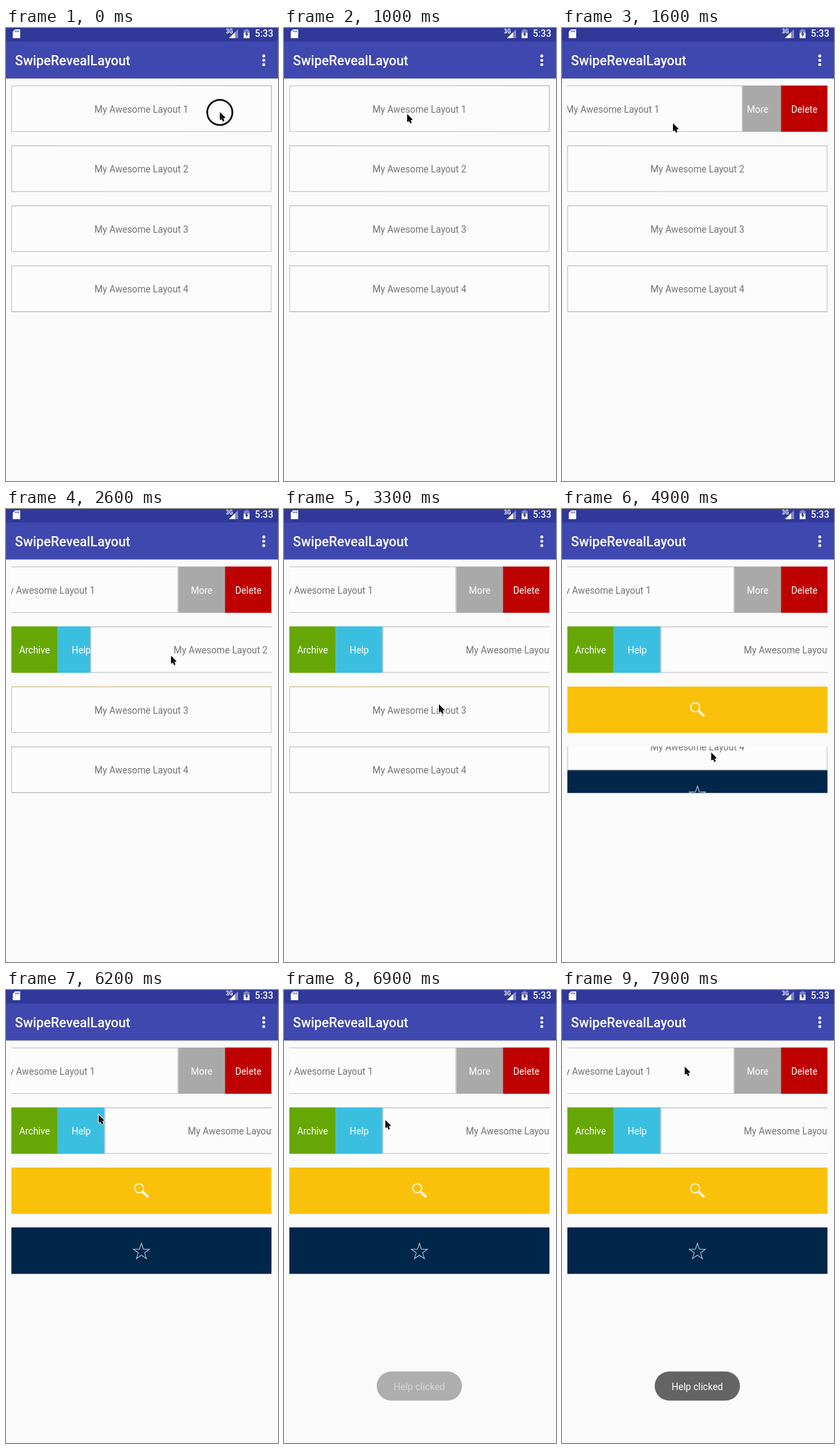
Write an HTML page with a canvas that moves like this. It is 402 px wide and 668 px high and loops after 8 s.

```html
<!DOCTYPE html>
<html lang="en">
<head>
<meta charset="utf-8">
<title>Swipe to reveal</title>
<style>
html, body { margin: 0; width: 100%; height: 100%; overflow: hidden; background: #fafafa; }
canvas { display: block; width: 402px; height: 668px; }
</style>
</head>
<body>
<canvas id="stage"></canvas>
<script>
const W = 402, H = 668, LOOP = 8000, STEP = 100;
const LEFT = 7.7, TOP = 84.6, PITCH = 88.5, ROW_W = 384.9, ROW_H = 68.7, BTN = 69, SETTLE = 750;
const RIGHT = LEFT + ROW_W, MID = LEFT + ROW_W / 2;
const INDIGO = '#303899', DIM = '#8388c2', WHITE = '#fff';
const canvas = document.getElementById('stage');
const ctx = canvas.getContext('2d');
const ratio = window.devicePixelRatio || 1;
canvas.width = W * ratio;
canvas.height = H * ratio;

// Buttons lie still under a row; a panel with an icon is pushed in with it.
const rows = [
  { start: 1186, dx: -2 * BTN, dy: 0, buttons: [['More', '#a9a9a9'], ['Delete', '#be0000']] },
  { start: 2250, dx: 2 * BTN, dy: 0, buttons: [['Archive', '#67a705'], ['Help', '#3bbfe1']] },
  { start: 3824, dx: 0, dy: ROW_H, fill: '#f9c10a', icon: magnifier },
  { start: 4750, dx: 0, dy: -ROW_H, fill: '#00264a', icon: star }
];

// Pointer key points: time, x, y
const stops = [
  [300, 316, 124], [1150, 170, 127], [1600, 164, 140.5],
  [2150, 88, 211], [2400, 246, 206], [3300, 229, 288],
  [3750, 228, 284], [4200, 222.5, 392], [4700, 221, 413],
  [4900, 220.5, 359], [5500, 386, 34], [6200, 137, 184],
  [6500, 137, 184], [6750, 104, 207], [7300, 355, 124], [7900, 181.5, 113]
];

const clamp = v => Math.max(0, Math.min(1, v));
const easeOut = u => 1 - Math.pow(1 - clamp(u), 3);
const smooth = u => u * u * (3 - 2 * u);

function pointerAt(t) {
  const next = Math.max(1, stops.findIndex(s => s[0] >= t));
  const [t0, x0, y0] = stops[next - 1], [t1, x1, y1] = stops[next];
  const k = smooth(clamp((t - t0) / (t1 - t0)));
  return [x0 + (x1 - x0) * k, y0 + (y1 - y0) * k];
}

function box(x, y, w, h, color) {
  ctx.fillStyle = color;
  ctx.fillRect(x, y, w, h);
}

function label(str, x, y, color = WHITE, size = 13.8, weight = 400, align = 'center') {
  ctx.font = `${weight} ${size}px Roboto, sans-serif`;
  ctx.textAlign = align;
  ctx.fillStyle = color;
  ctx.fillText(str, x, y);
}

function circle(x, y, r) {
  ctx.beginPath();
  ctx.arc(x, y, r, 0, Math.PI * 2);
}

function stroke(color, width) {
  ctx.strokeStyle = color;
  ctx.lineWidth = width;
  ctx.stroke();
}

// Right triangle with its right angle at x, y
function corner(x, y, w, h, color) {
  ctx.beginPath();
  ctx.moveTo(x, y);
  ctx.lineTo(x + w, y);
  ctx.lineTo(x, y + h);
  ctx.fillStyle = color;
  ctx.fill();
}

function magnifier(x, y) {
  const color = '#fef5d8';
  circle(x - 3.4, y - 3.6, 6.7);
  stroke(color, 1.8);
  ctx.beginPath();
  ctx.moveTo(x + 3, y + 2.8);
  ctx.lineTo(x + 9, y + 8.4);
  ctx.lineCap = 'round';
  stroke(color, 3.8);
  ctx.lineCap = 'butt';
}

function star(x, y) {
  ctx.beginPath();
  for (let i = 0; i < 10; i++) {
    const r = i % 2 ? 4.9 : 12.5, a = (i / 5 - 0.5) * Math.PI;
    ctx.lineTo(x + r * Math.cos(a), y + 1.6 + r * Math.sin(a));
  }
  ctx.closePath();
  stroke('#b4c0cc', 1.1);
}

function drawRow(row, i, t) {
  const p = easeOut((t - row.start) / SETTLE);
  const top = TOP + PITCH * i;
  const x = LEFT + row.dx * p, y = top + row.dy * p;
  ctx.save();
  ctx.beginPath();
  ctx.rect(LEFT, top, ROW_W, ROW_H);
  ctx.clip();
  if (row.buttons) {
    const first = row.dx > 0 ? LEFT : RIGHT - 2 * BTN;
    row.buttons.forEach(([name, color], n) => {
      box(first + n * BTN, top, BTN, ROW_H, color);
      label(name, first + (n + 0.5) * BTN, top + 39.9);
    });
  }
  box(x, y, ROW_W, ROW_H, '#fcfcfc');
  ctx.strokeStyle = '#c4c4c8';
  ctx.lineWidth = 1.3;
  ctx.strokeRect(x + 0.6, y + 0.6, ROW_W - 1.2, ROW_H - 1.2);
  label('My Awesome Layout ' + (i + 1), x + ROW_W / 2, y + 39.9, '#737373');
  if (row.icon) {
    const panel = y - row.dy;
    box(LEFT, panel, ROW_W, ROW_H, row.fill);
    row.icon(MID, panel + ROW_H / 2);
  }
  ctx.restore();
}

function drawBars() {
  box(0, 0, W, 20, INDIGO);
  box(0, 20, W, 54.5, '#3f48ae');
  label('SwipeRevealLayout', 13.3, 55, WHITE, 19.6, 500, 'left');
  for (let i = -1; i <= 1; i++) {
    circle(381, 47.6 + i * 6.3, 2.2);
    ctx.fillStyle = WHITE;
    ctx.fill();
  }

  // Memory card
  box(10, 2, 11, 13, WHITE);
  corner(10, 2, 3.5, 3.5, INDIGO);
  for (let i = 0; i < 3; i++) box(13.4 + i * 2.3, 3.6, 1.1, 2.6, INDIGO);

  // Signal
  label('3G', 325, 7.8, WHITE, 8.2, 700, 'left');
  corner(343, 15, -13.5, -13.2, DIM);
  corner(338.5, 15, -9, -8.8, WHITE);

  // Battery
  box(353.6, 1.6, 4, 2, DIM);
  box(351.3, 3, 8.6, 4, DIM);
  box(351.3, 7, 8.6, 8, WHITE);
  corner(356.3, 9.8, -3.1, -5.2, INDIGO);
  corner(355.1, 8.3, 3.1, 5.1, INDIGO);

  label('5:33', 395, 13.4, WHITE, 13.8, 500, 'right');
}

function drawToast(t) {
  ctx.globalAlpha = clamp((t - 6750) / 300);
  ctx.beginPath();
  ctx.roundRect(137, 562.5, 126, 43, 21.5);
  ctx.fillStyle = '#646464';
  ctx.fill();
  label('Help clicked', 200, 589.5, WHITE, 14);
  ctx.globalAlpha = 1;
}

function drawPointer(t) {
  const [x, y] = pointerAt(t);
  if (t < stops[0][0]) {
    circle(x, y + 0.5, 18.6);
    stroke('#000', 2.5);
  }
  ctx.save();
  ctx.translate(x, y);
  ctx.rotate(-Math.PI / 8);
  ctx.beginPath();
  ctx.moveTo(0, 0);
  ctx.lineTo(-4.5, 10.8);
  ctx.lineTo(4.5, 10.8);
  ctx.closePath();
  ctx.rect(-1.1, 9, 2.2, 5.4);
  stroke(WHITE, 1.8);
  ctx.fillStyle = '#000';
  ctx.fill('nonzero');
  ctx.fillRect(-1.1, 9, 2.2, 5.4);
  ctx.restore();
}

function draw(now) {
  const t = Math.floor((now % LOOP) / STEP) * STEP;
  ctx.setTransform(ratio, 0, 0, ratio, 0, 0);
  box(0, 0, W, H, '#fafafa');
  drawBars();
  rows.forEach((row, i) => drawRow(row, i, t));
  drawToast(t);
  drawPointer(t);
}

const begin = performance.now();
function tick() {
  draw(performance.now() - begin);
  requestAnimationFrame(tick);
}
tick();
</script>
</body>
</html>
```
